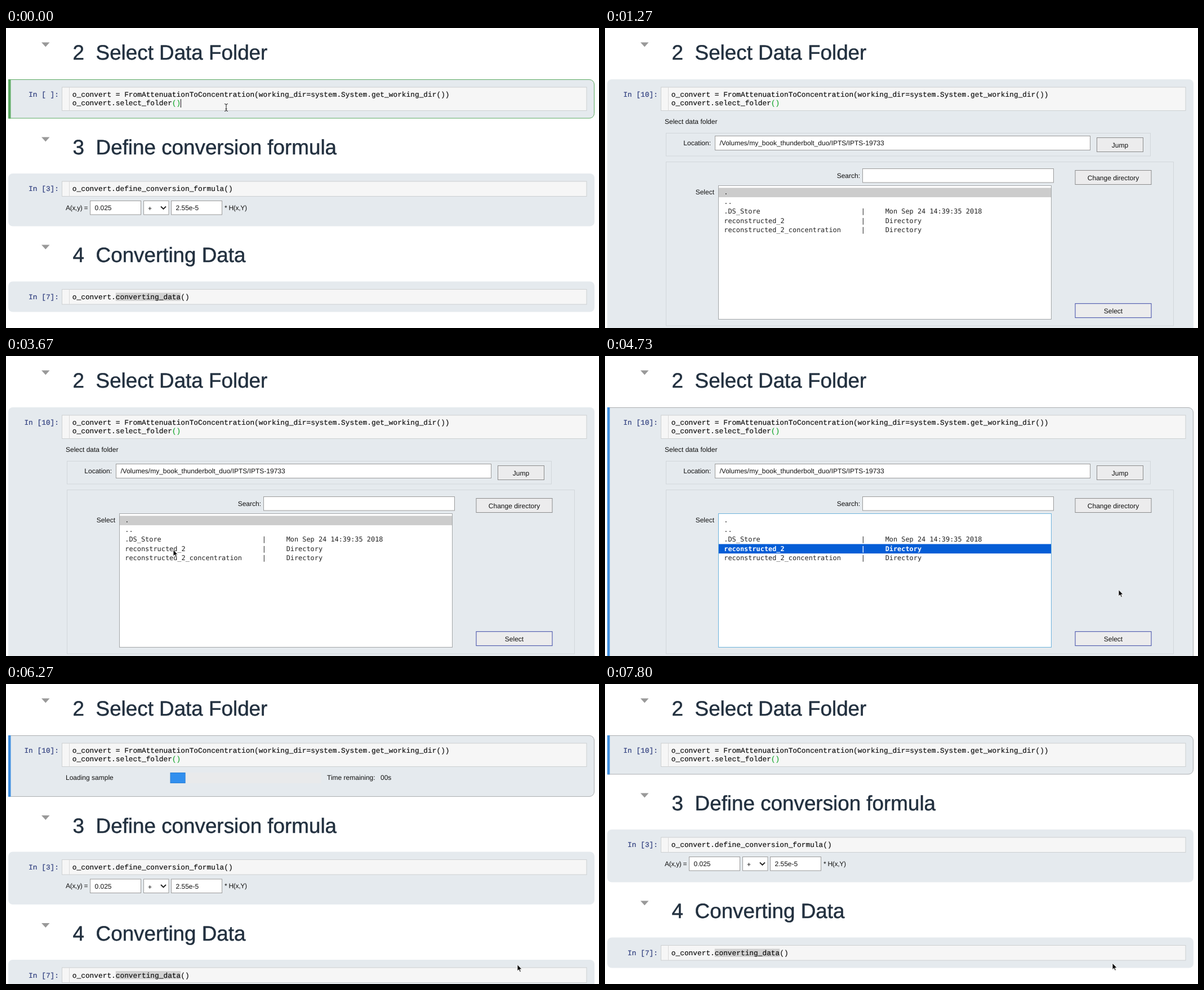
Animation of 1053x532 px, one loop 8870 ms. Source, as an HTML page:

```html
<!DOCTYPE html>
<html lang="en">
<head>
<meta charset="utf-8">
<title>Select data folder</title>
<style>
html, body { margin: 0; width: 100%; height: 100%; overflow: hidden; background: #fff; }
svg { display: block; width: 1053px; height: 532px; }
text { white-space: pre; text-rendering: geometricPrecision; }
.head { font: 36.8px "Liberation Sans", sans-serif; fill: #22303f; stroke: #22303f; stroke-width: .5px; }
.ui { font: 12px "Liberation Sans", sans-serif; fill: #111; }
.math { letter-spacing: -.3px; }
.code { font: 12.83px "Liberation Mono", monospace; fill: #111; stroke: #111; stroke-width: .2px; }
.row { font: 11.9px "DejaVu Sans Mono", monospace; fill: #222; }
.on { font-weight: bold; fill: #fff; }
.prompt { fill: #303f7f; stroke: #303f7f; }
.match { fill: #1ba832; stroke: #1ba832; }
</style>
</head>
<body>
<svg id="stage" viewBox="0 0 1053 532" xmlns="http://www.w3.org/2000/svg"></svg>
<script>
const LOOP = 8870;
const CELL = '#e5eaee';

const box = (x, y, w, h, fill, stroke = 'none', extra = '') =>
  `<rect x="${x}" y="${y}" width="${w}" height="${h}" fill="${fill}" stroke="${stroke}" ${extra}/>`;
const text = (cls, x, y, s, anchor = 'start', extra = '') =>
  `<text class="${cls}" x="${x}" y="${y}" text-anchor="${anchor}" ${extra}>${s}</text>`;
const heading = (num, title, y) =>
  `<path d="M63 ${y - 30.5}h14.5l-7.2 8z" fill="#999"/>` +
  text('head', 118.6, y, num) + text('head', 159.6, y, title);
const codeBox = (y, h) =>
  box(99.5, y, 931.5, h, '#f6f6f6', '#cdd0d2') +
  `<path d="M112.5 ${y}v${h}" stroke="#dadada"/>`;
const prompt = (y, s, id = '') => text('code prompt', 94, y, s, 'end', id);
const field = (x, y, w, h, s = '') =>
  box(x, y, w, h, '#fff', '#9b9b9b') + text('ui', x + 8, y + 16.5, s);
const button = (x, y, w, s, stroke, id = '') =>
  box(x, y, w, 25, '#ececed', stroke, id) + text('ui', x + w / 2, y + 17, s, 'middle');

// file list
const LIST_TOP = 283.4, ROW_H = 16.7;
const entry = (name, info) => name.padEnd(34) + '|     ' + info;
const files = [
  '.', '..',
  entry('.DS_Store', 'Mon Sep 24 14:39:35 2018'),
  entry('reconstructed_2', 'Directory'),
  entry('reconstructed_2_concentration', 'Directory')
];

const runCell =
  '<g id="frame"></g>' + codeBox(105, 41.5) + prompt(122, '', 'id="count"') +
  text('code', 117.8, 122, 'o_convert = FromAttenuationToConcentration(working_dir=system.System.get_working_dir())') +
  text('code', 117.8, 137, 'o_convert.select_folder<tspan class="match">()</tspan>') +
  '<path id="caret" d="M310.5 126v15" stroke="#111"/>';

const picker =
  text('ui', 106, 170, 'Select data folder') +
  box(108.5, 186.5, 860, 40.5, 'none', '#d2d7db') +
  text('ui', 188, 208, 'Location:', 'end') +
  field(195.5, 191.5, 666, 25, '/Volumes/my_book_thunderbolt_duo/IPTS/IPTS-19733') +
  button(873.5, 194.5, 82, 'Jump', '#8b8b8b') +
  box(108.5, 237.5, 901, 290.5, 'none', '#d2d7db') +
  text('ui', 453, 266, 'Search:', 'end') + field(457.5, 249.5, 339, 24.5) +
  button(835, 252.5, 135, 'Change directory', '#8b8b8b') +
  text('ui', 194, 295, 'Select', 'end') +
  box(201.5, 279.5, 591, 237, '#fff', '#a3a6a8', 'id="list"') +
  box(202, LIST_TOP, 590, ROW_H, '#ccc', 'none', 'id="mark"') +
  files.map((s, i) => text('row', 211.3, LIST_TOP + 12 + i * ROW_H, s, 'start', `id="file${i}"`)).join('') +
  button(835, 488.7, 135, 'Select', '#3a46a6', 'id="pick"');

const loading =
  text('ui', 106, 170, 'Loading sample') +
  box(291.5, 157, 268.5, 19, '#e9eaeb') +
  box(292, 157.5, 0, 18, '#318fee', '#2b80d6', 'id="bar"') +
  text('ui', 570, 170, 'Time remaining:') + text('ui', 665, 170, '00s');

const lower =
  heading('3', 'Define conversion formula', 224) +
  box(4, 258, 1041, 93.5, CELL, 'none', 'rx="8"') + codeBox(272, 26.5) +
  prompt(289, 'In [3]:') + text('code', 117.8, 289, 'o_convert.define_conversion_formula()') +
  text('ui math', 106, 322.5, 'A(x,y) =') + field(149.5, 306.5, 90, 24.5, '0.025') +
  box(244.5, 306.5, 44.5, 24.5, '#fff', '#9b9b9b') + text('ui', 252, 324, '+') +
  '<path d="M275 316.5l4.5 4.5 4.5-4.5" fill="none" stroke="#222" stroke-width="1.9"/>' +
  field(293.5, 306.5, 90, 24.5, '2.55e-5') + text('ui math', 388, 322.5, '* H(x,Y)') +
  heading('4', 'Converting Data', 415) +
  box(4, 449.5, 1041, 54, CELL, 'none', 'rx="8"') + codeBox(463.5, 26.5) +
  box(194.8, 469.5, 115.5, 14.5, '#d2d2d2') +
  prompt(481, 'In [7]:') + text('code', 117.8, 481, 'o_convert.converting_data()');

const pointer =
  '<path id="arrow" d="M0 0V11.6L2.7 9.1 4.5 13.2 6.4 12.4 4.7 8.4H8.2Z" fill="#0a0a0a" stroke="#fff" stroke-width=".9"/>' +
  '<path id="beam" d="M-3-6.5Q0-6.5 0-4.5Q0-6.5 3-6.5M0-4.5V4.5M-3 6.5Q0 6.5 0 4.5Q0 6.5 3 6.5M-1.5 2.5h3" fill="none" stroke="#222"/>';

document.getElementById('stage').innerHTML =
  box(0, 0, 1053, 532, '#fff') + heading('2', 'Select Data Folder', 56) +
  `<g id="lower">${lower}</g>` + runCell +
  `<g id="picker">${picker}</g><g id="loading">${loading}</g><g id="pointer">${pointer}</g>`;

const $ = id => document.getElementById(id);
const set = (id, attrs) => {
  for (const k in attrs) $(id).setAttribute(k, attrs[k]);
};
const show = (id, on) => set(id, { display: on ? 'inline' : 'none' });

// time, x, y of the pointer
const path = [
  [0, 391, 141], [133, 397, 137], [2000, 397, 137], [2933, 265, 334], [3666, 297, 343.5],
  [4000, 297, 343.5], [4733, 912, 414.5], [4866, 913, 424], [5200, 907, 496],
  [5333, 907, 496], [5533, 908, 497.5], [6266, 908, 497.5], [6800, 898, 493],
  [7200, 898, 493], [7666, 901, 495]
];

function pointerAt(t) {
  const i = path.findIndex(p => p[0] > t);
  if (i < 0) return path[path.length - 1].slice(1);
  const a = path[i - 1], b = path[i];
  const u = (t - a[0]) / (b[0] - a[0]), e = u * u * (3 - 2 * u);
  return [a[1] + (b[1] - a[1]) * e, a[2] + (b[2] - a[2]) * e];
}

function drawFrame(h, color, edge) {
  $('frame').innerHTML = color
    ? `<path d="M4.5 91.5H1036a8.5 8.5 0 0 1 8.5 8.5V${91 + h - 8}a8.5 8.5 0 0 1-8.5 8.5H4.5Z" fill="${CELL}" stroke="${edge}"/>` +
      box(4, 91, 4.5, h + 1, color)
    : box(4, 91, 1041, h, CELL, 'none', 'rx="8"');
}

function draw(t) {
  const tick = Math.floor((t + 4) * 3 / 200);
  const now = tick * 200 / 3;
  const picking = t >= 1200 && t < 6270, busy = t >= 6270 && t < 7800;

  const height = picking ? 470 : busy ? 108 : 68.5;
  if (t < 1130) drawFrame(height, '#5dab63', '#5dab63');
  else if (t < 4000) drawFrame(height);
  else drawFrame(height, '#3e8ee0', '#abaeb1');

  $('count').textContent = t < 1130 ? 'In [ ]:' : t < 1200 ? 'In [*]:' : 'In [10]:';
  show('caret', t < 470 || (t >= 930 && t < 1130));
  show('picker', picking);
  show('loading', busy);
  show('lower', !picking);
  set('lower', { transform: `translate(0 ${busy ? 39.5 : 0})` });

  const chosen = t >= 3800, focused = chosen && t < 6070;
  set('list', { stroke: focused ? '#6db3dc' : '#a3a6a8' });
  set('mark', { y: LIST_TOP + (chosen ? 3 * ROW_H : 0), fill: focused ? '#055dd6' : '#ccc' });
  set('file3', { class: focused ? 'row on' : 'row' });
  const hit = t >= 6070;
  set('pick', {
    stroke: hit ? '#2b66c6' : '#3a46a6', 'stroke-width': hit ? 2 : 1,
    fill: hit && t < 6200 ? '#dfdfe1' : '#ececed'
  });

  const step = 9 + Math.floor((tick - 103) * .75);
  set('bar', { width: Math.max(0, Math.min(268, step * 13.05)) });

  const [x, y] = pointerAt(now);
  const beam = y < 147 || (picking && y > 191 && y < 217 && x > 195);
  show('pointer', t < 330 || t >= 2070);
  show('beam', beam);
  show('arrow', !beam);
  set('pointer', { transform: `translate(${x.toFixed(1)} ${y.toFixed(1)})` });
}

const start = performance.now();
function loop() {
  draw((performance.now() - start) % LOOP);
  requestAnimationFrame(loop);
}
loop();
</script>
</body>
</html>
```
